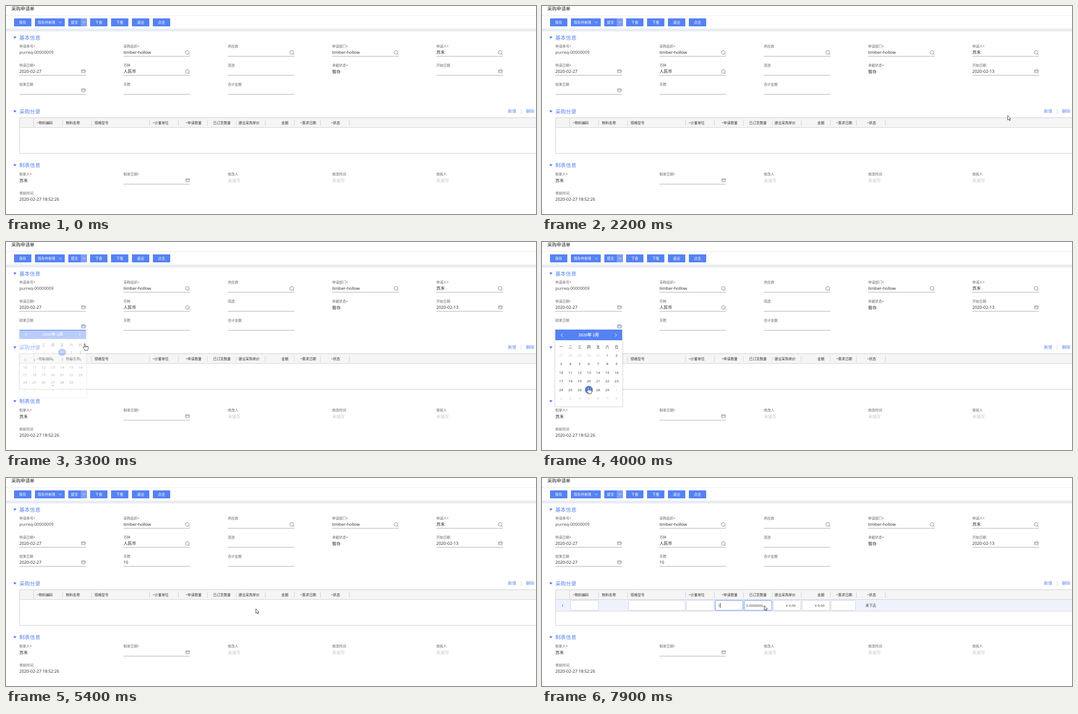
An HTML page for the animation above (8000 ms loop, 1191x470 px).

```html
<!DOCTYPE html>
<html lang="zh-CN">
<head>
<meta charset="utf-8">
<style>
  html, body { margin: 0; width: 100%; height: 100%; overflow: hidden; background: #fff; }
  svg { display: block; width: 1191px; height: 470px; }
  text { font-family: "Open Sans", "Noto Sans CJK SC", "Noto Sans CJK", sans-serif; white-space: pre; }
</style>
</head>
<body>
<svg id="stage" viewBox="0 0 1191 470">
  <g id="page"></g>
  <g id="live"></g>
</svg>
<script>
const LOOP = 8000, STEP = 100;
const BLUE = '#5582f3', DARK = '#262626', GREY = '#666', PALE = '#c6c6c6', RED = '#f04040';
const COLS = [30, 264, 498.5, 733, 967];
const ORG = 'timber-hollow', PERSON = '苏禾';

// Text is placed by its vertical centre.
const text = (x, y, s, size, fill = DARK, anchor = 'start', weight = 400) =>
  `<text x="${x}" y="${(y + size * 0.365).toFixed(2)}" font-size="${size}" fill="${fill}" text-anchor="${anchor}" font-weight="${weight}">${s}</text>`;
const rect = (x, y, w, h, fill, extra = '') =>
  `<rect x="${x}" y="${y}" width="${w}" height="${h}" fill="${fill}" ${extra}/>`;
const path = (d, stroke, width = 1, fill = 'none') =>
  `<path d="${d}" stroke="${stroke}" stroke-width="${width}" fill="${fill}"/>`;
const circle = (x, y, r, fill) => `<circle cx="${x}" cy="${y}" r="${r}" fill="${fill}"/>`;
const star = `<tspan fill="${RED}">*</tspan>`;

const lens = (x, y) =>
  `<circle cx="${x - 0.6}" cy="${y - 0.6}" r="4.1" fill="none" stroke="#666" stroke-width=".9"/>` +
  path(`M${x + 2.4} ${y + 2.4}l2.6 2.6`, '#666', 0.9);
const dateIcon = (x, y, color = '#667') =>
  rect(x - 4, y - 3.5, 8, 7, 'none', `rx=".8" stroke="${color}" stroke-width=".9"`) +
  path(`M${x - 4} ${y - 0.8}h8`, color, 0.9);
const chevron = (x, y) => path(`M${x - 2.8} ${y - 1.3}l2.8 2.8l2.8 -2.8`, '#fff', 1);

// kind: 'find', 'date', 'line' or none; y is the label's centre.
function field(col, y, label, need, value = '', kind, fill = DARK) {
  const x = COLS[col];
  let s = text(x, y, label + (need ? star : ''), 7.8, GREY);
  if (value) s += text(x, y + (kind || /^\w/.test(value) ? 14 : 14.7), value, 9.5, fill);
  if (kind) s += rect(x, y + 22, 149.5, 1, '#a3a3a8');
  if (kind === 'find') s += lens(x + 144, y + 14.5);
  if (kind === 'date') s += dateIcon(x + 144, y + 13.5);
  return s;
}

const section = (y, name) =>
  path(`M16.3 ${y - 2.4}h7.4l-3.7 5z`, 'none', 0, BLUE) + text(30, y, name, 11.8, BLUE);

function button(x, w, label, labelX = x + w / 2) {
  return rect(x, 28, w, 18, BLUE, 'rx="1"') + text(labelX, 37, label, 7.9, '#fff', 'middle', 500);
}

function drawPage() {
  let s = text(12, 6, '采购申请单', 10.4) + rect(0, 21, 1191, 1, '#e6e6e8') + rect(0, 51, 1191, 6.5, '#e8edf2');
  s += button(18, 39, '保存') + button(65, 67, '保存并新增', 91) + chevron(122, 37);
  s += button(140, 42, '提交', 154) + rect(168, 28, 14, 18, '#7d9ff6') + chevron(175, 37);
  ['下查', '下推', '退出', '点击'].forEach((b, i) => s += button(189 + 47 * i, 39, b));

  s += section(71.5, '基本信息');
  s += field(0, 91, '申请单号', 1, 'purreq-00000009', '', '#444');
  s += field(1, 91, '采购组织', 1, ORG, 'find');
  s += field(2, 91, '供应商', 0, '', 'find');
  s += field(3, 91, '申请部门', 1, ORG, 'find');
  s += field(4, 91, '申请人', 1, PERSON, 'find');
  s += field(0, 134, '申请日期', 1, '2020-02-27', 'date');
  s += field(1, 134, '币种', 0, '人民币', 'find');
  s += field(2, 134, '用途', 0, '', 'line');
  s += field(3, 134, '单据状态', 1, '暂存');
  s += field(4, 134, '开始日期', 0, '', 'date');
  s += field(0, 177, '结束日期', 0, '', 'date');
  s += field(1, 177, '天数', 0, '', 'line');
  s += field(2, 177, '合计金额', 0, '', 'line');

  s += section(238.5, '采购分录');
  s += text(1128, 238, '新增', 9.3, BLUE) + rect(1157, 232, 1, 12, '#d0d4dc') + text(1168.5, 238, '删除', 9.3, BLUE);
  s += rect(30.5, 252.5, 1170, 80.5, '#fff', 'stroke="#c8c8c8"');
  s += rect(31, 253, 1160, 21.5, '#f5f5f6') + rect(30, 274, 1161, 1, '#cfcfd2') + rect(62, 253, 1, 21, '#cfcfd2');
  [127, 192, 322, 387, 452, 517, 582, 647, 706, 771].forEach(x => s += rect(x, 258, 1, 13, '#cfcfd2'));
  const heads = [[69, '*物料编码'], [134.5, '物料名称'], [199, '规格型号'], [329.5, '*计量单位'], [403.5, '*申请数量'],
    [465.5, '已订货数量'], [522.5, '建议采购单价'], [619, '金额'], [661, '*需求日期'], [730.5, '*状态']];
  heads.forEach(([x, h]) => s += text(x, 264, h.replace('*', star), 7.9, '#333'));

  s += section(360, '制表信息');
  s += field(0, 380, '制单人', 1, PERSON);
  s += field(1, 380, '制单日期', 1, '', 'date');
  ['修改人', '修改时间', '审核人'].forEach((l, i) => s += field(2 + i, 380, l, 0, '未填写', '', PALE));
  s += field(0, 423, '审核时间', 0, '2020-02-27 18:52:26');
  return s;
}

// Month popup with its top left corner at (x, y); grow runs from 0 to 1.
function calendar(x, y, grow, pos, picked) {
  const cx = i => x + 13 + 20.75 * i, cy = j => y + 58 + 19.5 * j;
  const col = Math.round((pos.x - x - 13) / 20.75), row = Math.round((pos.y - y - 56) / 19.5);
  let s = '';
  for (let i = 1; i <= 4; i++)
    s += rect(x - i, y - i + 1, 150 + 2 * i, 172 + 2 * i, '#000', 'rx="3" opacity=".025"');
  s += rect(x, y, 150, 173, '#fff', 'rx="2"') + rect(x, y, 150, 24, BLUE);
  s += text(x + 75, y + 12, '2020年 2月', 9, '#fff', 'middle', 600);
  s += path(`M${x + 16.5} ${y + 8.5}l-3.6 3.7l3.6 3.7M${x + 134} ${y + 8.5}l3.6 3.7l-3.6 3.7`, '#fff');
  [...'一二三四五六日'].forEach((d, i) => s += text(cx(i), y + 39.5, d, 8, DARK, 'middle', 500));
  for (let n = 0; n < 42; n++) {
    const i = n % 7, j = Math.floor(n / 7), day = n - 4;
    const inside = day >= 1 && day <= 29;
    const label = inside ? day : day < 1 ? day + 31 : day - 29;
    let fill = inside ? '#333' : PALE;
    if (picked === day) {
      s += circle(cx(i), cy(j), 9, BLUE);
      fill = '#fff';
    } else if (i === col && j === row) s += circle(cx(i), cy(j), 9, '#e6edfd');
    s += text(cx(i), cy(j), label, 7.9, fill, 'middle');
  }
  s += circle(cx(3), y + 143.5, 2, BLUE);
  return `<g opacity="${grow}" transform="translate(0 ${y}) scale(1 ${0.8 + 0.2 * grow}) translate(0 ${-y})">${s}</g>`;
}

const input = (x, w, hot) => rect(x + 0.5, 276.5, w - 1, 22.5, '#fff', `rx="1" stroke="${hot ? BLUE : '#cdd1da'}"`);

function entryRow(t, pos) {
  const typed = t >= 7700, editing = t >= 7100;
  let s = rect(31, 275, 1160, 25.5, '#edf2fd') + rect(30, 300.5, 1161, 1, '#cdd1da');
  s += text(46.5, 288, '1', 7.8, '#333', 'middle');
  s += input(64, 63, !editing) + input(194, 128) + input(324, 63) + input(389, 63, editing);
  s += input(454, 63, editing && pos.x > 454) + input(519, 63) + input(584, 63) + input(649, 56);
  if (typed) s += text(395.5, 288, '1', 7.8) + rect(400, 282.5, 1, 11, '#111');
  else {
    if (editing) s += rect(393.5, 283, 45.5, 10.5, '#3a82f0');
    s += text(394, 288, '0.0000000...', 7.8, editing ? '#fff' : '#333');
  }
  s += text(459, 288, '0.0000000...', 7.8, '#333');
  s += text(570, 288, '¥ 0.00', 7.8, '#333', 'end') + text(635, 288, '¥ 0.00', 7.8, '#333', 'end');
  return s + text(727, 288, '未下达', 7.9, '#333');
}

// Pointer path: time, x, y
const TRACK = [
  [100, 1180, 58], [300, 1131, 114], [400, 1121, 136], [500, 1108, 146], [700, 1108, 146],
  [1000, 979, 188], [1100, 979, 210], [1200, 992, 222], [1400, 1042, 287], [1500, 1042, 287],
  [1600, 1042, 294], [1700, 1042, 294], [1900, 1044, 247], [2200, 1046, 247], [2800, 209, 197],
  [2900, 173, 188], [3200, 173, 188], [3300, 177, 230], [3500, 146, 289], [3800, 104, 328],
  [4100, 104, 328], [4300, 318, 225], [4400, 352, 210], [4500, 430, 211], [4700, 546, 231],
  [4900, 546, 231], [5400, 561, 295], [5500, 561, 295], [5600, 171, 268], [5900, 1182, 252],
  [6200, 1134, 236], [6300, 1134, 236], [6500, 533, 334], [6700, 533, 334], [6900, 432, 330],
  [7100, 438, 289], [7600, 438, 289], [7900, 499, 288]
];

function pointerAt(t) {
  const k = TRACK.findIndex(p => p[0] > t);
  if (k === 0) return { x: TRACK[0][1], y: TRACK[0][2] };
  if (k < 0) return { x: TRACK.at(-1)[1], y: TRACK.at(-1)[2] };
  const [t0, x0, y0] = TRACK[k - 1], [t1, x1, y1] = TRACK[k], p = (t - t0) / (t1 - t0);
  return { x: x0 + (x1 - x0) * p, y: y0 + (y1 - y0) * p };
}

const within = (t, a, b) => t >= a && t < b;

function pointer(t, pos) {
  if (t < 100 || within(t, 5700, 5900)) return '';
  const hand = within(t, 500, 2200) || within(t, 2900, 4100) || within(t, 6100, 6400);
  const shape = hand
    ? path('M-1.2 8.5V1Q-1.2 -.2 0 -.2T1.2 1V5.2Q2.6 4.4 3.6 5.6Q5 5 5.8 6.2Q8 5.8 8 7.8V10.5Q8 12 6.8 13.2V15H.2V13.5L-3.8 9Q-4.4 7.6 -3.2 7.3Q-2.2 7.2 -1.2 8.5zM1.2 5.2V8M3.6 5.7V8M5.8 6.3V8', '#222', 0.9, '#fff')
    : path('M.5 .5V10.8L2.9 8.6L4.5 12.2L6.1 11.5L4.5 8H7.6z', '#222', 0.9, '#fff');
  return `<g transform="translate(${pos.x.toFixed(1)} ${pos.y.toFixed(1)})">${shape}</g>`;
}

const grow = (t, start) => Math.max(0, Math.min(1, (t - start) / 200));

function drawLive(t) {
  const pos = pointerAt(t);
  let s = '';
  if (t >= 2200) s += text(967, 148, '2020-02-13', 9.5);
  if (t >= 4100) s += text(30, 191, '2020-02-27', 9.5) + text(264, 191, '15', 9.5);
  if (t >= 6400) s += entryRow(t, pos);
  if (within(t, 500, 2200)) {
    s += rect(967, 156, 149.5, 1, BLUE);
    s += calendar(967, 154.5, grow(t, 520), pos, t >= 2000 ? 13 : 0);
  }
  if (within(t, 3200, 4100)) {
    s += rect(30, 199, 149.5, 1, BLUE) + dateIcon(174, 190.5, '#7f9cf0');
    s += calendar(30, 198, grow(t, 3220), pos, t >= 4000 ? 27 : 0);
  }
  return s + pointer(t, pos);
}

const live = document.getElementById('live');
document.getElementById('page').innerHTML = drawPage();
const begin = performance.now();
let shown = -1;

function tick() {
  const t = Math.floor(((performance.now() - begin) % LOOP) / STEP) * STEP;
  if (t !== shown) live.innerHTML = drawLive(shown = t);
  requestAnimationFrame(tick);
}
tick();
</script>
</body>
</html>
```
